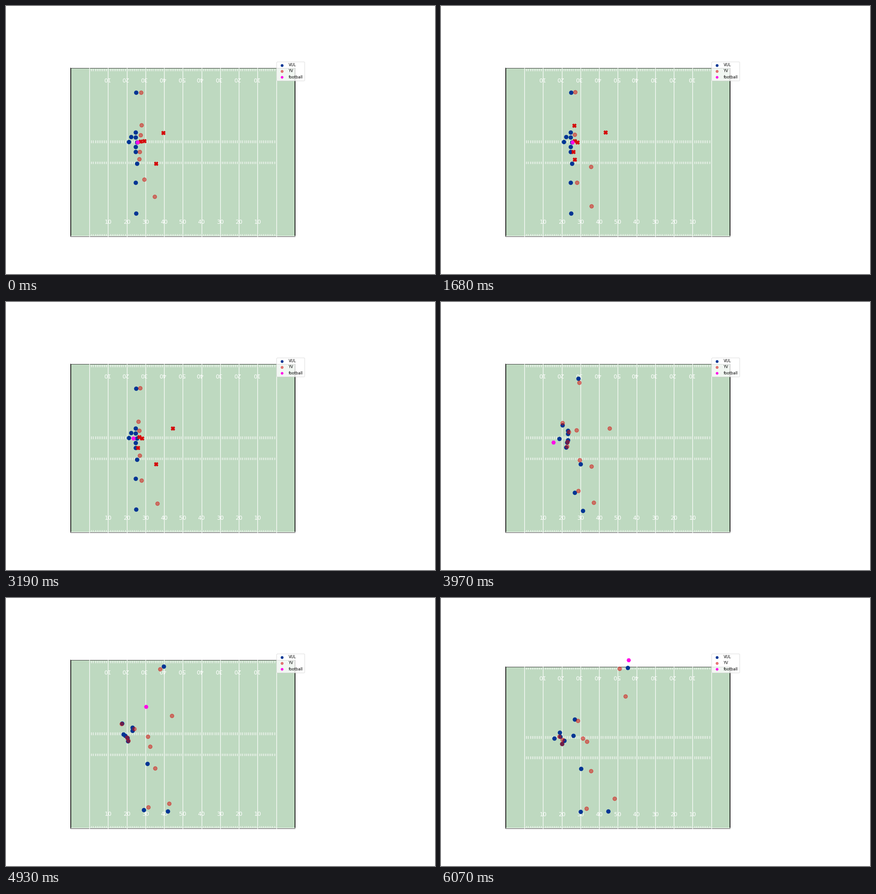
Write a matplotlib script that moves like this. It is 947 px wide and 592 px high and loops after 6.13 s.

```python
import numpy as np
import matplotlib.pyplot as plt
from matplotlib.animation import FuncAnimation
from matplotlib.collections import LineCollection
from matplotlib.patches import Rectangle

W, H = 947, 592
LEFT, RIGHT, TOP, BOTTOM = 142.95, 638.0, 137.3, 509.0
LENGTH, WIDTH = 120, 53.3
LOOP_MS, SLOTS, HELD = 6130, 102, 44

GRASS, NAVY, RED, PINK = "#bed9c0", "#003594", "#d50a0a", "#ff08e8"

# Steps of the play: line-up, snap, pocket, throw, whistle.
KEYS = np.array([0, 52, 65, 81, 100])

# Offense stands still until the snap: where each goes by pocket, throw, whistle (stage pixels).
LINE = {
    "lt": [(268, 272), (255.5, 277), (262, 288.4)],
    "lg": [(279.5, 291), (279, 292.5), (291.5, 295.7)],
    "c": [(279.5, 304.5), (263, 303.5), (263, 297.8)],
    "rg": [(277.5, 309.5), (268, 308.5), (272, 307.1)],
    "rt": [(275.5, 321), (269, 316), (267, 314.4)],
}
BACKS = {  # line-up spot first
    "wr": [(286.5, 191), (303, 169), (347.5, 150.5), (412, 139.6)],
    "rb": [(275.7, 288.5), (279.5, 284), (279, 285.5), (295, 258.2)],
    "qb": [(271, 300.3), (260.5, 301.5), (258.5, 301), (250, 302.4)],
    "te": [(289.2, 347.5), (308, 358), (312, 365.5), (308.5, 371.6)],
    "slot": [(286, 390.3), (295, 420.5), (303.5, 467.5), (307.5, 470.5)],
    "wide": [(287, 457.8), (313, 460.5), (356.5, 471), (369, 469.5)],
}

# Defenders on a man: line-up, snap, opponent, gap to him at the pocket and at the whistle.
MARKING = {
    "end": [(298.5, 263), (292, 264), "lt", (0, -5), (-1, 9)],
    "tackle": [(296.5, 284.5), (294, 284), "rb", (2.5, 3), (6.5, 3.5)],
    "nose": [(297, 299), (294, 297.5), "rg", (1.5, -0.5), (-4, -1.5)],
    "guard": [(295, 321.5), (291, 322), "rt", (2, -2.5), (0, 0)],
    "corner": [(297.5, 191), (296, 189.5), "wr", (1.5, 9), (-18, 2.6)],
    "nickel": [(305, 382.5), (299, 393.5), "slot", (8, -4), (13, -7.5)],
}
# Free defenders: one point for each step of the play.
ROAMING = {
    "mike": [(305, 298), (299.5, 301), (298.5, 282.5), (313, 305.5), (312.5, 302.4)],
    "edge": [(294, 338), (295, 339), (305.5, 348.5), (318, 328), (321.5, 309.7)],
    "free": [(346.5, 279.5), (367.7, 279), (372, 279), (366, 259.5), (407, 205.1)],
    "strong": [(331, 348), (331, 358), (332, 362.5), (328.5, 375.5), (331, 377.4)],
    "deep": [(327.5, 420.5), (333.5, 445), (336.5, 443), (359.5, 454), (382.5, 440.8)],
}

# Who is shown as a cross, up to each of these steps.
PHASES = [14, 40, 58]
ALWAYS = {"nose", "mike", "free"}
CROSSED = [ALWAYS | {"strong"}, ALWAYS | {"end", "guard", "edge"},
           ALWAYS | {"guard", "strong"}, set()]

BALL_KEYS = [0, 50, 54.5, 65, 72, 95, 100]
BALL = [(290, 300.5), (290, 300.5), (270, 301), (248.3, 310.3), (249, 307),
        (402, 135.2), (414, 122.4)]


def yards(px):
    """Stage pixels to field yards."""
    px = np.asarray(px, float)
    x = (px[..., 0] - LEFT) / (RIGHT - LEFT) * LENGTH
    y = (BOTTOM - px[..., 1]) / (BOTTOM - TOP) * WIDTH
    return np.stack([x, y], axis=-1)


def build_paths():
    """Waypoints of both teams, shaped (step, player, xy)."""
    men = {}
    for i, (name, route) in enumerate(LINE.items()):
        start = (288.5 if name == "c" else 285.5, 279 + 10.8 * i)
        men[name] = [start, start] + route
    for name, route in BACKS.items():
        men[name] = route[:1] + route

    rivals = {}
    share = (KEYS[2:, None] - KEYS[2]) / (KEYS[-1] - KEYS[2])
    for name, (start, snap, man, near, last) in MARKING.items():
        gap = np.array(near) + share * np.subtract(last, near)
        rivals[name] = [start, snap, *(men[man][2:] + gap)]
    rivals.update(ROAMING)

    def stack(team):
        return yards(list(team.values())).swapaxes(0, 1)

    return stack(men), stack(rivals), list(rivals)


def glide(p, t):
    """Monotone cubic through the waypoints: brisk start, soft end."""
    h = np.diff(KEYS)[:, None, None]
    d = np.diff(p, axis=0) / h
    a, b = d[:-1], d[1:]
    s = a + b
    inner = np.where(a * b > 0, 2 * a * b / np.where(s == 0, 1, s), 0)
    m = np.concatenate([3 * d[:1], inner, 0.5 * d[-1:]])
    i = min(np.searchsorted(KEYS, t, side="right") - 1, len(KEYS) - 2)
    n = KEYS[i + 1] - KEYS[i]
    u = (t - KEYS[i]) / n
    ease = u * u * (3 - 2 * u)
    return (p[i] + ease * (p[i + 1] - p[i])
            + n * u * (1 - u) * ((1 - u) * m[i] - u * m[i + 1]))


def ball_at(t):
    path = yards(BALL)
    return np.array([np.interp(t, BALL_KEYS, path[:, k]) for k in (0, 1)])


def draw_field(ax):
    ax.add_patch(Rectangle((0, 0), LENGTH, WIDTH, fc=GRASS, ec="black", lw=1.67,
                           zorder=0, clip_on=False))
    paint = dict(color="white", lw=1.25, zorder=2, clip_on=False)
    pixel = WIDTH / (BOTTOM - TOP)
    for y in (0, WIDTH):
        ax.plot([0, LENGTH], [y + pixel] * 2, **paint)
    for x in range(10, 111, 10):
        ax.plot([x, x], [0, WIDTH], **paint)

    rows = [(0.4, 0.7), (23.03, 23.69), (29.73, 30.39), (52.5, 53.0)]
    ticks = [[(x, a), (x, b)] for x in range(11, 110) for a, b in rows]
    ax.add_collection(LineCollection(ticks, capstyle="projecting", **paint), autolim=False)

    style = dict(ha="center", color="white", fontsize=12.5, zorder=3)
    for x in range(20, 110, 10):
        label = str(min(x, LENGTH - x) - 10)
        ax.text(x, 4, label, **style)
        ax.text(x - 0.95, WIDTH - 4, label, rotation=180, **style)


def dots(color, marker="o", alpha=1, z=4, size=8.33, lw=1.25, **kw):
    return ax.scatter([], [], s=size**2, c=color, marker=marker, alpha=alpha,
                      linewidths=lw, zorder=z, clip_on=False, **kw)


plt.rcParams["font.family"] = "DejaVu Sans"
fig = plt.figure(figsize=(W / 72, H / 72), dpi=72, facecolor="white")
ax = fig.add_axes([LEFT / W, 1 - BOTTOM / H, (RIGHT - LEFT) / W, (BOTTOM - TOP) / H])
ax.axis("off")
draw_field(ax)
ax.set_xlim(0, LENGTH)

offense = dots(NAVY, z=4)
defense = dots(RED, alpha=0.5, z=5)
crosses = dots(RED, "X", z=5.1)
football = dots(PINK, "H", z=6)

keys = [dots(c, m, a, size=5, lw=1.25, label=name)
        for name, c, m, a in (("VUL", NAVY, "o", 1), ("YV", RED, "o", 0.5),
                              ("football", PINK, "H", 1))]
legend = ax.legend(handles=keys, loc="upper right", bbox_to_anchor=(1.05, 1.05),
                   fontsize=8.33)
legend.get_frame().set_linewidth(0.83)
legend.set_zorder(10)

MEN, RIVALS, NAMES = build_paths()


def update(slot):
    t = slot if slot < HELD else slot - 1
    ball = ball_at(t)
    ax.set_ylim(0, max(WIDTH, ball[1]))  # the view stretches to keep the ball in
    offense.set_offsets(glide(MEN, t))
    spots = glide(RIVALS, t)
    marked = CROSSED[np.searchsorted(PHASES, t, side="right")]
    cross = np.array([name in marked for name in NAMES])
    defense.set_offsets(spots[~cross])
    crosses.set_offsets(spots[cross])
    football.set_offsets(ball[None])
    return offense, defense, crosses, football


anim = FuncAnimation(fig, update, frames=SLOTS, interval=LOOP_MS / SLOTS,
                     repeat=True, repeat_delay=0, blit=False)
plt.show()
```
